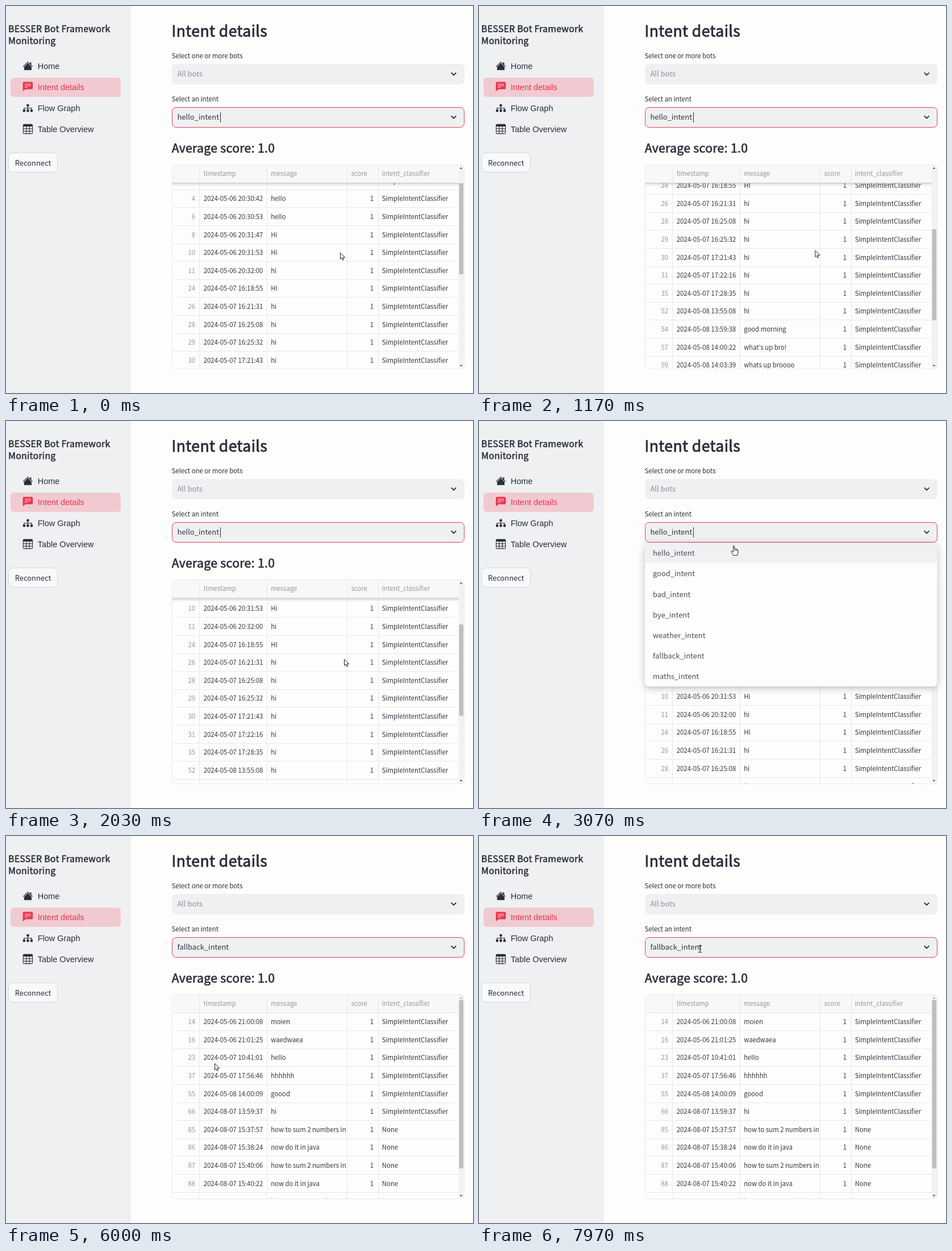
Animation, 822 px wide and 681 px high, one loop 8000 ms. Source, as an HTML page with a canvas:

```html
<!DOCTYPE html>
<html lang="en">
<head>
<meta charset="utf-8">
<title>Intent details</title>
<style>
html, body { margin: 0; width: 100%; height: 100%; overflow: hidden; background: #fdfdfc; }
canvas { display: block; width: 822px; height: 681px; }
</style>
</head>
<body>
<canvas id="stage" width="822" height="681"></canvas>
<script>
const ctx = document.getElementById('stage').getContext('2d');
const LOOP = 8000;
const SANS = '"Noto Sans CJK JP", "Noto Sans CJK SC", "Noto Sans CJK", "Noto Sans", sans-serif';
const MENU = '"Liberation Sans", Arial, sans-serif';
const DARK = '#2b2d39', CELL = '#353741', GREY = '#93959a', RED = '#e9354f';
const PAPER = '#fdfdfc', FIELD = '#eef0f2', LINE = '#e7e8e8';

// Moments of the interaction, in ms
const OPEN = 2800, PICK = 4080, LOADED = 4600;

const ROW = 31.6, TOP = 279, HEAD = 32, VIEW = 359;
const COLUMNS = [340, 459, 600, 655];
const OPTIONS = ['hello', 'good', 'bad', 'bye', 'weather', 'fallback', 'maths'].map(n => n + '_intent');

const parse = text => text.trim().split('\n').map(line => line.split('|'));

const hello = { count: 23, rows: parse(`
0|05-06 20:29:20|hi
2|05-06 20:30:34|hi
4|05-06 20:30:42|hello
6|05-06 20:30:53|hello
8|05-06 20:31:47|Hi
10|05-06 20:31:53|Hi
11|05-06 20:32:00|hi
24|05-07 16:18:55|HI
26|05-07 16:21:31|hi
28|05-07 16:25:08|hi
29|05-07 16:25:32|hi
30|05-07 17:21:43|hi
31|05-07 17:22:16|hi
35|05-07 17:28:35|hi
52|05-08 13:55:08|hi
54|05-08 13:59:38|good morning
57|05-08 14:00:22|what's up bro!
59|05-08 14:03:39|whats up broooo`) };

const fallback = { count: 12, rows: parse(`
14|05-06 21:00:08|moien
16|05-06 21:01:25|waedwaea
23|05-07 10:41:01|hello
37|05-07 17:56:46|hhhhhh
55|05-08 14:00:09|goood
66|08-07 13:59:37|hi
85|08-07 15:37:57|how to sum 2 numbers in java|None
86|08-07 15:38:24|now do it in java|None
87|08-07 15:40:06|how to sum 2 numbers in java|None
88|08-07 15:40:22|now do it in java|None
89|08-07 15:41:10|how to sum 2 numbers|None`) };

// time, x, y of the pointer tip
const POINTER = [
  [0, 588, 434], [1170, 591.3, 430], [2030, 595, 419], [2350, 590, 405], [2750, 452, 199],
  [2900, 449, 201], [3070, 449, 219], [3400, 430, 300], [3850, 391, 411], [4080, 389, 417],
  [4300, 389, 417], [6000, 367, 400], [7200, 367, 400], [7850, 389, 199], [8000, 389, 199]
];

const smooth = x => { x = Math.min(1, Math.max(0, x)); return x * x * (3 - 2 * x); };

function pointerAt(t) {
  const i = POINTER.findIndex(p => p[0] > t);
  const [t0, x0, y0] = POINTER[i - 1], [t1, x1, y1] = POINTER[i];
  const k = smooth((t - t0) / (t1 - t0));
  return [x0 + (x1 - x0) * k, y0 + (y1 - y0) * k];
}

// Three wheel notches down, three back up
function scrollAt(t) {
  const notch = start => smooth((t - start) / 150);
  return 77.4 * (notch(-90) + notch(430) + notch(880) - notch(1700) - notch(2180) - notch(2420));
}

function text(str, x, y, size, color = DARK, { align = 'left', family = SANS } = {}) {
  ctx.font = `${size}px ${family}`;
  ctx.textAlign = align;
  ctx.fillStyle = color;
  ctx.fillText(str, x, y);
}

// A thin outline thickens the regular weight to semibold
function heading(str, x, y, size) {
  ctx.save();
  ctx.letterSpacing = `${0.0147 * size}px`;
  text(str, x, y, size);
  ctx.strokeStyle = DARK;
  ctx.lineWidth = 0.032 * size;
  ctx.lineJoin = 'round';
  ctx.strokeText(str, x, y);
  ctx.restore();
}

function box(x, y, w, h, r, fill, stroke) {
  ctx.beginPath();
  ctx.roundRect(x, y, w, h, r);
  if (fill) { ctx.fillStyle = fill; ctx.fill(); }
  if (stroke) { ctx.strokeStyle = stroke; ctx.lineWidth = 1; ctx.stroke(); }
}

function rect(x, y, w, h, fill) {
  ctx.fillStyle = fill;
  ctx.fillRect(x, y, w, h);
}

function shape(points, fill, stroke, width = 1, close = true) {
  ctx.beginPath();
  points.forEach(([x, y]) => ctx.lineTo(x, y));
  if (close) ctx.closePath();
  if (fill) { ctx.fillStyle = fill; ctx.fill(); }
  if (stroke) { ctx.strokeStyle = stroke; ctx.lineWidth = width; ctx.stroke(); }
}

function at(x, y, scale, draw) {
  ctx.save();
  ctx.translate(x, y);
  ctx.scale(scale, scale);
  draw();
  ctx.restore();
}

// Icons live on a 16-unit grid
function houseIcon() {
  ctx.lineJoin = ctx.lineCap = 'round';
  rect(11.5, 2, 2, 4, DARK);
  shape([[8, 3.3], [14, 9.3], [14, 14.5], [2, 14.5], [2, 9.3]], DARK);
  shape([[0.9, 8.5], [8, 1.5], [15.1, 8.5]], null, DARK, 1.1, false);
}

function chatIcon() {
  box(0, 0, 16, 12, 2, RED);
  shape([[0, 9], [0, 15.3], [4.2, 12], [6, 10]], RED);
  [[3.2, 10], [5.7, 10], [8.2, 5]].forEach(([y, w]) => rect(3, y, w, 1, '#f3cfd5'));
}

function treeIcon() {
  box(6, 1.5, 4, 4, 1.3, DARK);
  rect(7.5, 5, 1, 6, DARK);
  rect(1.5, 7.5, 13, 1, DARK);
  [0, 6, 12].forEach(x => {
    rect(x + 1.5, 7.5, 1, 3, DARK);
    box(x, 10.2, 4, 4, 1.3, DARK);
  });
}

function tableIcon() {
  box(0, 0, 16, 16, 2, DARK);
  for (let r = 0; r < 3; r++)
    for (let c = 0; c < 3; c++) rect(1 + c * 5, 4 + r * 4, 4, 3, '#eef0f3');
}

function sidebar() {
  rect(0, 0, 220, 681, '#eef0f2');
  heading('BESSER Bot Framework', 4, 45.5, 15.9);
  heading('Monitoring', 4, 67, 15.9);
  box(8, 126, 194, 34, 6, '#f1cad1');
  [['Home', houseIcon, 97, 111], ['Intent details', chatIcon, 133.5, 148],
   ['Flow Graph', treeIcon, 171, 185], ['Table Overview', tableIcon, 207.7, 222]]
    .forEach(([label, icon, top, base]) => {
      at(29.7, top, 1.09, icon);
      text(label, 55.8, base, 14.45, icon === chatIcon ? RED : DARK, { family: MENU });
    });
  box(4.5, 258.5, 86, 34, 7, '#f8f9fa', '#d3d5d8');
  text('Reconnect', 15.7, 280.5, 12.94);
}

function selectField(y, value, color, border) {
  box(292.5, y + 0.5, 514, 35, 7, FIELD, border);
  text(value, 301.5, y + 22.4, 12.94, color);
  ctx.lineCap = ctx.lineJoin = 'round';
  shape([[784.3, y + 15.8], [788, y + 19.6], [791.7, y + 15.8]], null, DARK, 1.9, false);
}

function caretOn(t) {
  const phase = t < PICK ? t + 400 : t - PICK - 20;
  return (phase + 1060) % 1060 < 530;
}

function form(t) {
  const value = OPTIONS[t < PICK ? 0 : 5];
  heading('Intent details', 291.5, 54, 26.6);
  text('Select one or more bots', 291.7, 92, 11.32);
  selectField(102, 'All bots', '#8d9096', FIELD);
  text('Select an intent', 291.7, 167.5, 11.32);
  selectField(178, value, '#33353f', '#de405a');
  if (caretOn(t)) rect(t < PICK ? 377 : 394, 187, 1, 18, DARK);
  heading('Average score: 1.0', 291.7, 258.3, 21.2);
}

function tableRows(rows, scroll) {
  ctx.save();
  ctx.beginPath();
  ctx.rect(292, TOP + HEAD, 504.5, VIEW - HEAD);
  ctx.clip();
  rows.forEach(([id, time, message, kind = 'SimpleIntentClassifier'], i) => {
    const y = TOP + HEAD + i * ROW - scroll, base = y + 20.1;
    rect(292, Math.floor(y + ROW), 505, 1, LINE);
    text(id, 333, base, 11.32, GREY, { align: 'right' });
    text('2024-' + time, 347.8, base, 11.32, CELL);
    text('1', 647, base, 11.32, CELL, { align: 'right' });
    text(kind, 661.7, base, 11.32, CELL);
    ctx.save();
    ctx.beginPath();
    ctx.rect(459, TOP, 141, VIEW);
    ctx.clip();
    text(message, 466.2, base, 11.32, CELL);
    ctx.restore();
  });
  ctx.restore();
}

function scrollbar(count, scroll) {
  const total = HEAD + count * ROW, ratio = 339 / total;
  rect(796.5, TOP, 10, VIEW, '#f1f2f1');
  rect(797.5, 289 + scroll * ratio, 7.5, VIEW * ratio, '#bebfbe');
  shape([[798.7, 286.5], [801, 283.8], [803.3, 286.5]], scroll > 0.5 ? '#444' : '#a0a0a0');
  shape([[798.7, 631.8], [801, 634.5], [803.3, 631.8]], '#444');
}

function table(t) {
  const data = t < LOADED ? hello : fallback, scroll = scrollAt(t);
  ctx.save();
  ctx.beginPath();
  ctx.roundRect(292, TOP, 514.5, VIEW + 0.5, 7);
  ctx.clip();
  tableRows(data.rows, scroll);
  rect(292, TOP, 505, HEAD, '#f7f8f9');
  COLUMNS.forEach(x => rect(x, TOP, 1, VIEW, LINE));
  rect(292, TOP + HEAD, 505, 1, '#e4e5e6');
  if (scroll > 0.5) {
    const shade = ctx.createLinearGradient(0, 311, 0, 318);
    shade.addColorStop(0, 'rgba(60,65,75,.18)');
    shade.addColorStop(1, 'rgba(60,65,75,0)');
    rect(292, 311, 505, 7, shade);
  }
  [['timestamp', 347.8], ['message', 466.2], ['score', 607.5], ['intent_classifier', 661.7]]
    .forEach(([label, x]) => text(label, x, 299.3, 11.32, GREY));
  scrollbar(data.count, scroll);
  ctx.restore();
  box(292.5, TOP + 0.5, 514, VIEW, 7, null, '#e9eaea');
}

function dropdown(pointerY) {
  ctx.save();
  ctx.shadowColor = 'rgba(0,0,0,.24)';
  ctx.shadowBlur = 14;
  ctx.shadowOffsetY = 3;
  box(292, 215, 514.5, 252, 7, PAPER);
  ctx.restore();
  const hover = Math.max(0, Math.min(6, Math.floor((pointerY - 214.5) / 36.1)));
  ctx.save();
  ctx.beginPath();
  ctx.roundRect(292, 214, 514.5, 253, 7);
  ctx.clip();
  rect(292, 214.5 + hover * 36.1, 515, 35.6, '#eff1f2');
  ctx.restore();
  OPTIONS.forEach((name, i) => text(name, 306, 237.3 + i * 36.1, 12.94, '#4b4d57'));
}

function arrowCursor() {
  shape([[0.5, 0.5], [0.5, 11.5], [2.9, 9.2], [4.6, 13.2], [6.4, 12.4], [4.8, 8.6], [8.3, 8.6]], '#fff', '#222');
}

function handCursor() {
  ctx.lineJoin = 'round';
  shape([[-1.6, 1], [-0.5, 0], [0.6, 1], [0.6, 6], [3, 6.2], [5.6, 7.2], [7, 8.4], [7, 12.5],
         [5.6, 17.5], [-1.2, 17.5], [-3, 14], [-5.4, 10.8], [-4.4, 9.3], [-1.6, 11.3]], '#fff', '#222');
  [0.8, 3, 5].forEach(x => rect(x, 6.8, 0.8, 3, '#222'));
}

function beamCursor() {
  rect(-0.6, -6, 1.2, 12, '#222');
  [-6.5, 5.3].forEach(y => {
    rect(-3, y, 2.4, 1.1, '#222');
    rect(0.6, y, 2.4, 1.1, '#222');
  });
}

function render() {
  const t = performance.now() % LOOP;
  const [x, y] = pointerAt(t), open = t >= OPEN && t < PICK;
  rect(0, 0, 822, 681, PAPER);
  sidebar();
  form(t);
  table(t);
  if (open) dropdown(y);
  const onField = y > 178 && y < 214;
  at(x, y, 1, onField ? beamCursor : open ? handCursor : arrowCursor);
  requestAnimationFrame(render);
}
render();
</script>
</body>
</html>
```
